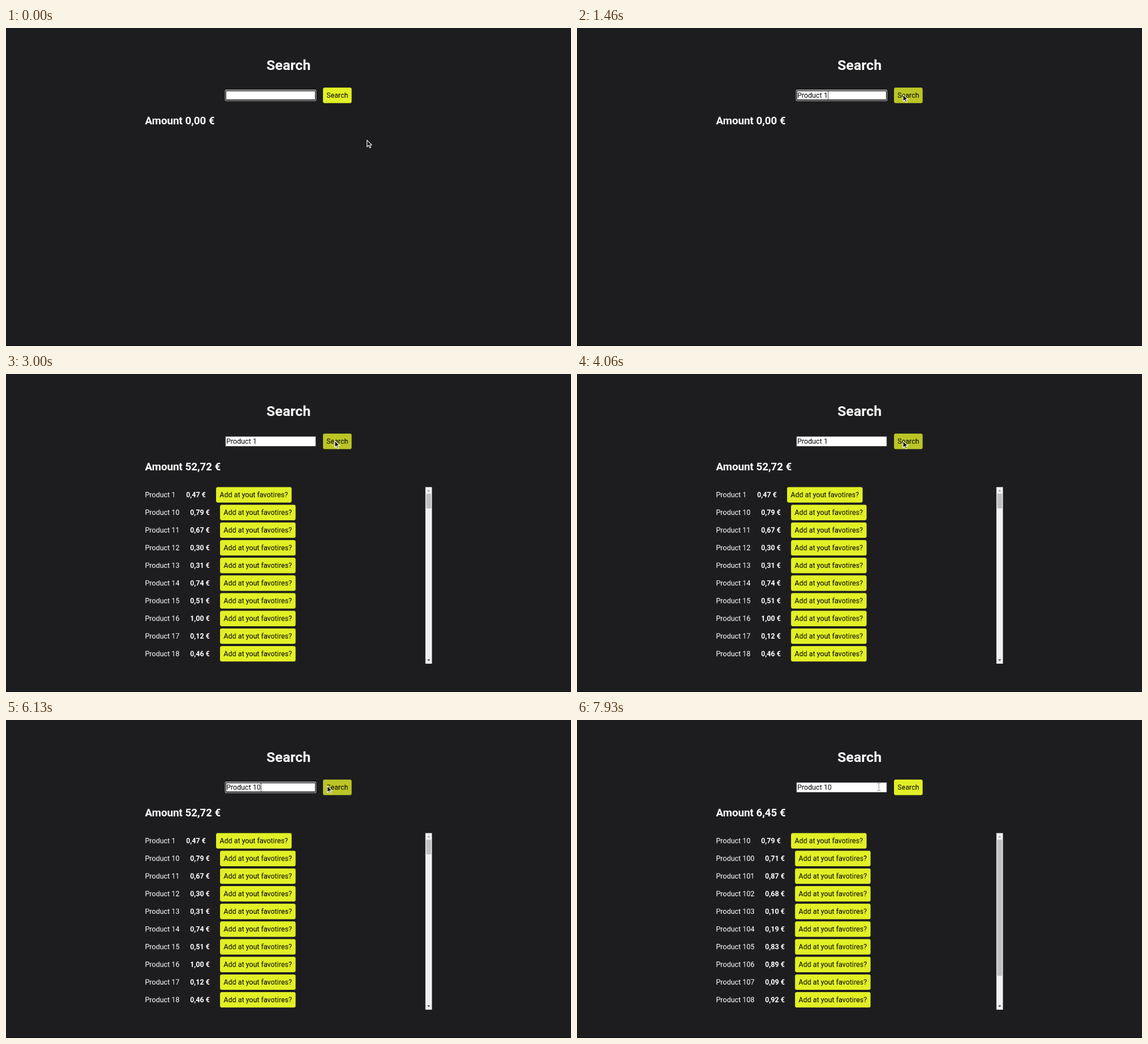
Write an HTML page with a canvas that moves like this. It is 998 px wide and 561 px high and loops after 8000 ms.

```html
<!DOCTYPE html>
<html lang="en">
<head>
<meta charset="utf-8">
<title>Product search</title>
<style>
html, body { margin: 0; width: 100%; height: 100%; overflow: hidden; background: #1d1d1f; }
canvas { display: block; width: 998px; height: 561px; }
</style>
</head>
<body>
<canvas id="stage" width="1280" height="720"></canvas>
<script>
// The page is laid out at 1280 x 720 and shown scaled down
const ctx = document.getElementById('stage').getContext('2d');
const LOOP = 8000, FPS = 15;
const YELLOW = '#e2f026', HOVER = '#bbc526', WHITE = '#fff', PAGE = '#1d1d1f';
const FIELD = [497, 141, 205, 23], BUTTON = [718, 135, 65, 35];
const LEFT = 315, TOP = 256, ROW = 40, VIEW = 400;

// Pointer moves: begin, end, x, y
const START = [817, 253];
const MOVES = [
  [60, 800, 650, 151], [1130, 1530, 744, 150], [3400, 3600, 738, 151],
  [4060, 4530, 681, 154], [5600, 6130, 727, 148], [7667, 7930, 684, 151]
];
const CLICKS = [866, 2000, 4565, 6266];

const SEARCHES = [
  { query: 1, total: '52,72', rows: 112,
    prices: '0,47 0,79 0,67 0,30 0,31 0,74 0,51 1,00 0,12 0,46'.split(' ') },
  { query: 10, total: '6,45', rows: 12,
    prices: '0,79 0,71 0,87 0,68 0,10 0,19 0,83 0,89 0,09 0,92'.split(' ') }
];

function box(x, y, w, h, color, radius = 0) {
  ctx.fillStyle = color;
  ctx.beginPath();
  ctx.roundRect(x, y, w, h, radius);
  ctx.fill();
}

// Draws text and returns its right edge
function text(str, x, y, { size = 16, weight = 400, color = WHITE, align = 'left' } = {}) {
  ctx.font = `${weight} ${size}px Roboto, sans-serif`;
  ctx.fillStyle = color;
  ctx.textAlign = align;
  ctx.fillText(str, x, y);
  return x + ctx.measureText(str).width;
}

function shape(points, color) {
  ctx.beginPath();
  points.forEach(([x, y]) => ctx.lineTo(x, y));
  ctx.closePath();
  ctx.fillStyle = color;
  ctx.fill();
}

const inside = ([px, py], [x, y, w, h]) => px >= x && px <= x + w && py >= y && py <= y + h;

function pointerAt(t) {
  let [x, y] = START;
  for (const [begin, end, toX, toY] of MOVES) {
    const u = Math.min(1, Math.max(0, (t - begin) / (end - begin)));
    const ease = u * u * (3 - 2 * u);
    x += (toX - x) * ease;
    y += (toY - y) * ease;
  }
  return [x, y];
}

function drawField(t) {
  const focused = t < 2000 || (t >= 4565 && t < 6260);
  const value = t < 1130 ? '' : t < 5260 ? 'Product 1' : 'Product 10';
  const layer = (grow, color, radius) => {
    const [x, y, w, h] = FIELD;
    box(x - grow, y - grow, w + 2 * grow, h + 2 * grow, color, radius);
  };
  if (focused) {
    layer(1, WHITE, 3);
    layer(0, '#101010', 2);
    layer(-2, WHITE);
  } else {
    layer(0, '#767676');
    layer(-1, WHITE);
  }
  const end = text(value, 499, 158, { color: '#000' });
  if (focused && value) box(Math.round(end), 143, 1, 19, '#000');
}

function drawList({ query, prices, rows }) {
  prices.forEach((price, i) => {
    const id = i ? query * 10 + i - 1 : query;
    const y = TOP + ROW * i, base = y + 23;
    const nameEnd = text(`Product ${id}`, LEFT, base);
    const priceEnd = text(`${price} €`, nameEnd + 24, base, { weight: 700 });
    const x = Math.round(priceEnd + 23.6);
    box(x, y, 171, 35, YELLOW, 4);
    text('Add at yout favotires?', x + 8, base, { color: '#000' });
  });
  const bar = 15, x = LEFT + 650 - bar, mid = x + bar / 2;
  box(x, TOP, bar, VIEW, '#f1f1f1');
  box(x + 2, TOP + bar, bar - 4, (VIEW - 2 * bar) * VIEW / (rows * ROW), '#c1c1c1');
  const arrow = (y, dir, color) => shape([[mid - 3.5, y], [mid + 3.5, y], [mid, y + 4 * dir]], color);
  arrow(TOP + 10, -1, '#a3a3a3');
  arrow(TOP + VIEW - 10, 1, '#505050');
}

function drawRing(t, [x, y]) {
  const start = CLICKS.find(c => t >= c && t < c + 200);
  if (!start) return;
  const u = (t - start) / 200;
  const ring = color => {
    ctx.strokeStyle = color;
    ctx.beginPath();
    ctx.arc(x + 1.5, y + 1.5, 32 * (1 - u), 0, 7);
    ctx.stroke();
  };
  ctx.save();
  ctx.lineWidth = 4 - 2.7 * u;
  ctx.globalAlpha = 1 - .6 * u;
  // Brighter where the ring crosses light controls
  const light = new Path2D(), dark = new Path2D();
  light.rect(...FIELD);
  light.rect(...BUTTON);
  dark.rect(0, 0, 1280, 720);
  dark.addPath(light);
  ctx.save();
  ctx.clip(dark, 'evenodd');
  ring('#800010');
  ctx.restore();
  ctx.clip(light);
  ring('rgba(255,0,30,.6)');
  ctx.restore();
}

function drawPointer([x, y], beam) {
  ctx.save();
  ctx.translate(Math.round(x), Math.round(y));
  if (beam) {
    box(-.5, -8, 1, 16, '#666');
    box(-4, -8, 8, 1, '#777');
    box(-4, 8, 8, 1, '#777');
  } else {
    ctx.lineJoin = 'round';
    ctx.lineWidth = 1.4;
    ctx.strokeStyle = WHITE;
    shape([[.7, .9], [.7, 16], [4.4, 12.7], [7, 18.5], [9.4, 17.4], [6.9, 11.8], [11.7, 11.8]], '#0c0c0c');
    ctx.stroke();
  }
  ctx.restore();
}

function draw(now) {
  const t = Math.floor((now % LOOP + 7) * FPS / 1000) * 1000 / FPS;
  const pointer = pointerAt(t);
  const found = t < 2999 ? null : SEARCHES[t < 7130 ? 0 : 1];

  box(0, 0, 1280, 720, PAGE);
  box(0, 719, 1280, 1, '#0e0e0f');
  text('Search', 640, 95, { size: 32, weight: 700, align: 'center' });
  drawField(t);
  box(...BUTTON, inside(pointer, BUTTON) ? HOVER : YELLOW, 4);
  text('Search', 750.5, 158, { color: '#000', align: 'center' });
  text(`Amount ${found ? found.total : '0,00'} €`, LEFT, 218, { size: 24, weight: 700 });
  if (found) drawList(found);
  drawRing(t, pointer);
  drawPointer(pointer, inside(pointer, FIELD));
}

const begin = performance.now();
function tick() {
  draw(performance.now() - begin);
  requestAnimationFrame(tick);
}
tick();
</script>
</body>
</html>
```
